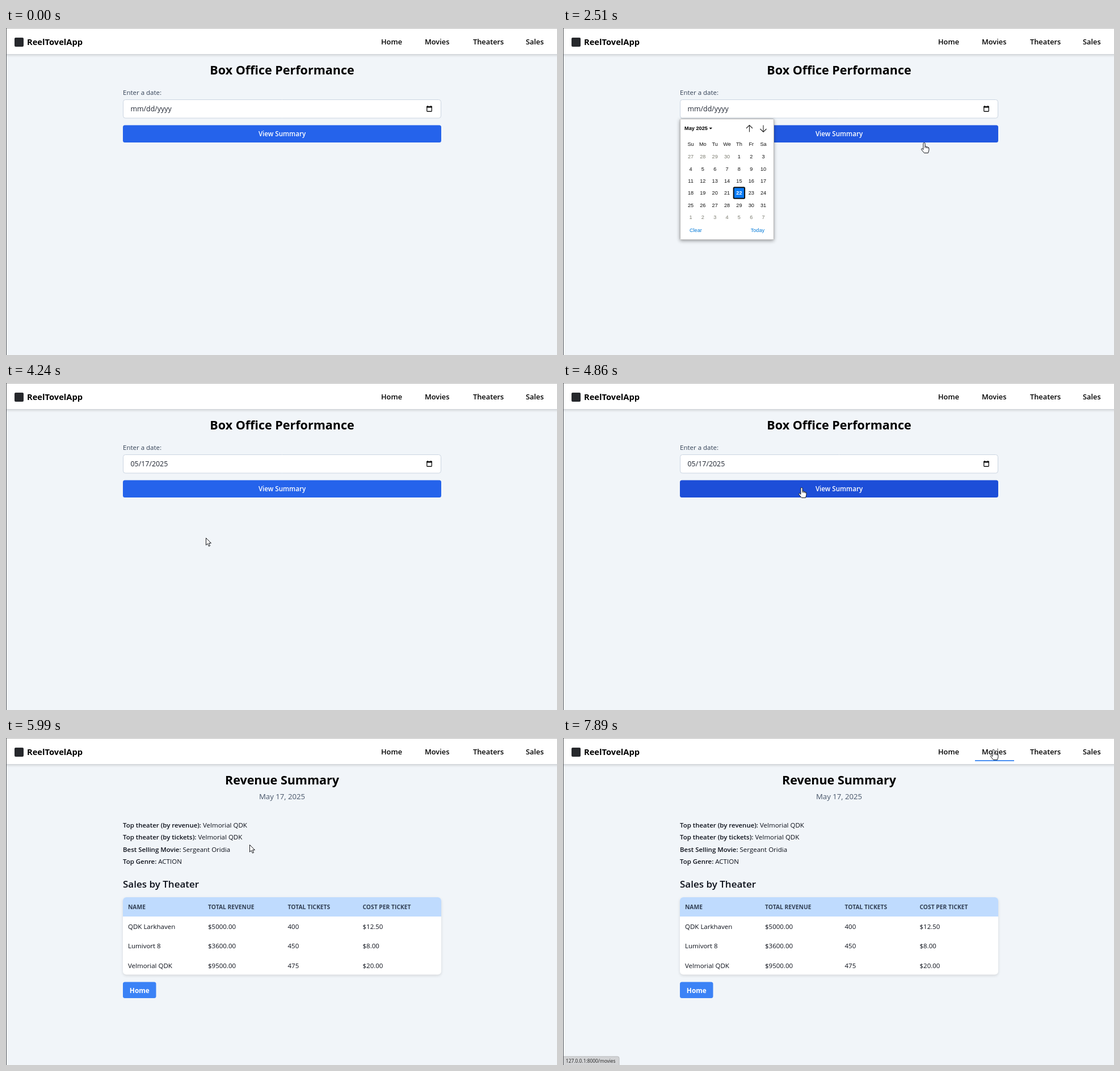
Write an HTML page with a canvas that moves like this. It is 971x577 px and loops after 8 s.

```html
<!DOCTYPE html>
<html lang="en">
<head>
<meta charset="utf-8">
<title>Box Office Performance</title>
<style>
  html, body { margin: 0; width: 100%; height: 100%; overflow: hidden; background: #f1f5f9; }
  canvas { display: block; width: 971px; height: 577px; }
</style>
</head>
<body>
<canvas id="stage"></canvas>
<script>
const W = 971, H = 577, LOOP = 8000, TICK = 70, FADE = 150;
const LEFT = 206, WIDTH = 561, MID = LEFT + WIDTH / 2;
const canvas = document.getElementById('stage');
const ctx = canvas.getContext('2d');
const dpr = window.devicePixelRatio || 1;
canvas.width = W * dpr;
canvas.height = H * dpr;

const UI = '"Open Sans", "Noto Sans", sans-serif';
const ARIAL = '"Liberation Sans", Arial, sans-serif';

// Story times in ms
const ENTER = 790, OPEN = 2110, PICK = 3760, CLOSE = 3900, CLOSED = 4200;
const LOADING = 5660, NAVIGATE = 5860, STATUS = 7720;

// Each pointer move runs on a curve from the last resting place
const origin = { x: 849, y: 485 };
const moves = [
  { from: ENTER, to: 1570, bend: { x: 790, y: 240 }, end: { x: 760, y: 150 } },
  { from: 1640, to: 1780, bend: { x: 753, y: 147 }, end: { x: 746, y: 144 } },
  { from: 2370, to: 3140, bend: { x: 600, y: 241 }, end: { x: 331, y: 283 } },
  { from: 3220, to: 3560, bend: { x: 358, y: 277 }, end: { x: 352, y: 273 } },
  { from: 4440, to: 5000, bend: { x: 390, y: 215 }, end: { x: 424, y: 180 } },
  { from: 5330, to: 5470, bend: { x: 427, y: 184 }, end: { x: 429, y: 188 } },
  { from: 6920, to: 7690, bend: { x: 676, y: 78 }, end: { x: 758, y: 20 } }
];

const clamp = v => Math.max(0, Math.min(1, v));
const mix = (a, b, k) => a + (b - a) * k;
const ramp = (t, from, to) => clamp((t - from) / (to - from));
const easeOut = k => 1 - (1 - k) ** 2;
const curve = (a, b, c, k) => Math.round(mix(mix(a, b, k), mix(b, c, k), k));

function pointerAt(t) {
  let p = origin;
  for (const { from, to, bend, end } of moves) {
    if (t < from) break;
    const stepped = t >= to ? to : from + Math.floor((t - from) / TICK) * TICK;
    const k = easeOut(ramp(stepped, from, to));
    p = { x: curve(p.x, bend.x, end.x, k), y: curve(p.y, bend.y, end.y, k) };
  }
  return p;
}

const inside = (p, x, y, w, h) => p.x >= x && p.x < x + w && p.y >= y && p.y < y + h;
const onButton = p => inside(p, LEFT, 171, WIDTH, 32);
const onLink = p => inside(p, 726, 8, 69, 38);

// Share of the last FADE ms that the pointer spent over an area
function hover(t, test) {
  const n = 15;
  let hits = 0;
  for (let i = 0; i < n; i++) {
    const s = t - i * FADE / n;
    if (s >= ENTER && test(pointerAt(s))) hits++;
  }
  return hits / n;
}

function text(str, x, y, size, { weight = 400, color = '#0b0f19', align = 'left', face = UI } = {}) {
  ctx.font = `${weight} ${size}px ${face}`;
  ctx.fillStyle = color;
  ctx.textAlign = align;
  ctx.fillText(str, x, Math.round(y));
  return ctx.measureText(str).width;
}

function box(x, y, w, h, r, fill, stroke, line = 1) {
  ctx.beginPath();
  ctx.roundRect(x, y, w, h, r);
  if (fill) { ctx.fillStyle = fill; ctx.fill(); }
  if (stroke) { ctx.strokeStyle = stroke; ctx.lineWidth = line; ctx.stroke(); }
}

function shadowed(alpha, blur, offset, draw) {
  ctx.save();
  ctx.shadowColor = `rgba(0,0,0,${alpha})`;
  ctx.shadowBlur = blur * dpr;
  ctx.shadowOffsetY = offset * dpr;
  draw();
  ctx.restore();
}

function faded(alpha, draw) {
  if (alpha <= 0) return;
  ctx.save();
  ctx.globalAlpha = alpha;
  draw();
  ctx.restore();
}

function drawNav(t) {
  shadowed(0.2, 5, 1.5, () => box(-8, 0, W + 16, 46, 0, '#fff'));
  box(15, 17, 16, 16, 2, '#26282c');
  text('ReelTovelApp', 37, 30, 14.7, { weight: 700, color: '#000' });
  const links = { Home: 661, Movies: 738, Theaters: 823, Sales: 916 };
  for (const label in links) text(label, links[label], 29, 12.8, { weight: 600, color: '#000' });
  faded(hover(t, onLink), () => box(726, 39, 69, 2, 0, '#4a90f2'));
}

function drawTitle(str) {
  text(str, MID, 82, 21.5, { weight: 700, color: '#000', align: 'center' });
}

function drawForm(t) {
  drawTitle('Box Office Performance');
  text('Enter a date:', LEFT, 118, 11.5, { weight: 500, color: '#334155' });
  box(LEFT + 0.5, 126.5, WIDTH - 1, 32.5, 4, '#fff', '#cbd5e1');
  text(t < PICK ? 'mm/dd/yyyy' : '05/17/2025', 219.5, 147, 12.4, { color: '#1e2430' });

  // Date icon
  box(741.75, 138.75, 8.5, 8.5, 1, null, '#111', 1.3);
  box(741, 138, 10, 2.6, 0, '#111');
  for (const x of [742.5, 748]) box(x, 137, 1.5, 2, 0, '#111');

  const k = hover(t, onButton);
  box(LEFT, 171.5, WIDTH, 30.5, 3.5, `rgb(${mix(37, 29, k)},${mix(99, 78, k)},${mix(235, 216, k)})`);
  text('View Summary', MID, 191, 11.6, { weight: 600, color: '#fff', align: 'center' });
}

function drawArrowIcon(x, dir) {
  const y = 177.5;
  ctx.beginPath();
  ctx.moveTo(x, y - 6 * dir);
  ctx.lineTo(x, y + 6 * dir);
  ctx.moveTo(x - 5.5, y + 0.5 * dir);
  ctx.lineTo(x, y + 6 * dir);
  ctx.lineTo(x + 5.5, y + 0.5 * dir);
  ctx.strokeStyle = '#222';
  ctx.lineWidth = 1.1;
  ctx.stroke();
}

function drawCalendar(t, p) {
  const step = 21.35, half = step / 2, left = 225, top = 227;
  const small = { face: ARIAL, color: '#111', align: 'center' };
  shadowed(0.4, 6, 2, () => box(LEFT, 160, 165.5, 213.5, 1, '#fff'));
  box(LEFT + 0.5, 160.5, 165, 213, 1, '#fff', '#b4b4b4');

  text('May 2025', 214, 180, 9.2, { weight: 700, face: ARIAL, color: '#000' });
  ctx.fill(new Path2D('M257.5 175.8H263L260.25 178.8Z'));
  drawArrowIcon(328.5, -1);
  drawArrowIcon(353, 1);
  'Su Mo Tu We Th Fr Sa'.split(' ').forEach((d, i) => text(d, left + i * step, 208, 9.2, small));

  const chosen = t < PICK ? 22 : 17;
  for (let i = 0; i < 42; i++) {
    const n = i - 3;
    const day = n < 1 ? n + 30 : n > 31 ? n - 31 : n;
    const x = left + (i % 7) * step, y = top + Math.floor(i / 7) * step;
    const style = { ...small, color: n === day ? '#111' : '#7c7c70' };
    if (n === chosen) {
      box(x - 9.7, y - 9.7, 19.4, 19.4, 1.5, '#0a7bf5', '#101010', 2);
      Object.assign(style, { color: '#fff', weight: 700 });
    } else if (inside(p, x - half, y - half, step, step)) {
      box(x - half, y - half, step, step, 2, '#e6e6e6');
    }
    text(day, x, y + 3.4, 9.2, style);
  }
  const link = { face: ARIAL, color: '#0078d7' };
  text('Clear', 223, 360, 9.1, link);
  text('Today', 355, 360, 9.1, { ...link, align: 'right' });
}

function drawSummary() {
  drawTitle('Revenue Summary');
  text('May 17, 2025', MID, 108, 13.2, { color: '#475569', align: 'center' });

  const facts = [
    ['Top theater (by revenue): ', 'Velmorial QDK'],
    ['Top theater (by tickets): ', 'Velmorial QDK'],
    ['Best Selling Movie: ', 'Sergeant Oridia'],
    ['Top Genre: ', 'ACTION']
  ];
  facts.forEach(([label, value], i) => {
    const y = 158 + i * 21.3;
    const w = text(label, LEFT, y, 11.45, { weight: 600 });
    text(value, LEFT + w, y, 11.5);
  });

  text('Sales by Theater', LEFT, 264, 17, { weight: 600 });
  shadowed(0.12, 5, 2, () => box(LEFT, 281, WIDTH, 136.5, 6, '#fff'));
  box(LEFT, 281, WIDTH, 34, [6, 6, 0, 0], '#bfdbfe');

  const cols = [215, 356, 496.5, 628.5];
  const rows = [
    ['QDK Larkhaven', '$5000.00', '400', '$12.50'],
    ['Lumivort 8', '$3600.00', '450', '$8.00'],
    ['Velmorial QDK', '$9500.00', '475', '$20.00']
  ];
  ['NAME', 'TOTAL REVENUE', 'TOTAL TICKETS', 'COST PER TICKET'].forEach((h, i) =>
    text(h, cols[i], 302, 10.3, { weight: 700, color: '#334155' }));
  rows.forEach((row, r) => row.forEach((cell, i) => text(cell, cols[i], 337 + r * 34.3, 11.5)));

  box(LEFT, 430.5, 58.5, 28.5, 3.5, '#3b82f6');
  text('Home', 235.3, 450, 11.8, { weight: 700, color: '#fff', align: 'center' });
}

function drawStatus() {
  box(0.5, 562, 98.5, 16, [0, 3, 0, 0], '#d2d3d5', '#b9babc');
  text('127.0.0.1:8000/movies', 5, 573, 8.4, { color: '#222' });
}

const arrow = new Path2D('M0 0V12.6L2.9 9.9L4.9 14.6L7 13.7L5 9.1H9Z');
const hand = new Path2D('M-1.6 12V1.6Q-1.6 0 0 0Q1.6 0 1.6 1.6V6.4Q4 5.9 4.1 7.3Q6.3 6.8 6.5 8.3' +
  'Q8.4 8 8.4 9.8V13.2L7 18H0L-4.6 12.4Q-5.6 10.4 -3.8 9.9Z');
const knuckles = new Path2D('M1.6 6.4V9.2M4.1 7.3V9.6M6.5 8.3V10');

function drawPointer(p, isHand) {
  const shape = isHand ? hand : arrow;
  ctx.save();
  ctx.translate(p.x + 0.5, p.y + 0.5);
  ctx.fillStyle = '#fff';
  ctx.strokeStyle = '#16181d';
  ctx.lineWidth = 1;
  ctx.lineJoin = 'round';
  ctx.fill(shape);
  ctx.stroke(shape);
  if (isHand) ctx.stroke(knuckles);
  ctx.restore();
}

function render(t) {
  const p = pointerAt(t);
  ctx.setTransform(dpr, 0, 0, dpr, 0, 0);
  box(0, 0, W, H, 0, '#f1f5f9');
  drawNav(t);
  if (t < NAVIGATE) drawForm(t);
  else drawSummary();
  if (t >= OPEN) faded(1 - ramp(t, CLOSE, CLOSED), () => drawCalendar(t, p));
  faded(ramp(t, STATUS, STATUS + FADE), drawStatus);
  box(0, 0, W, 1, 0, '#b8b8b8');
  box(0, 0, 1, H, 0, '#55575a');
  if (t >= ENTER) drawPointer(p, onLink(p) || (t < LOADING && onButton(p)));
}

const start = performance.now();
function frame() {
  render((performance.now() - start) % LOOP);
  requestAnimationFrame(frame);
}
frame();
</script>
</body>
</html>
```
